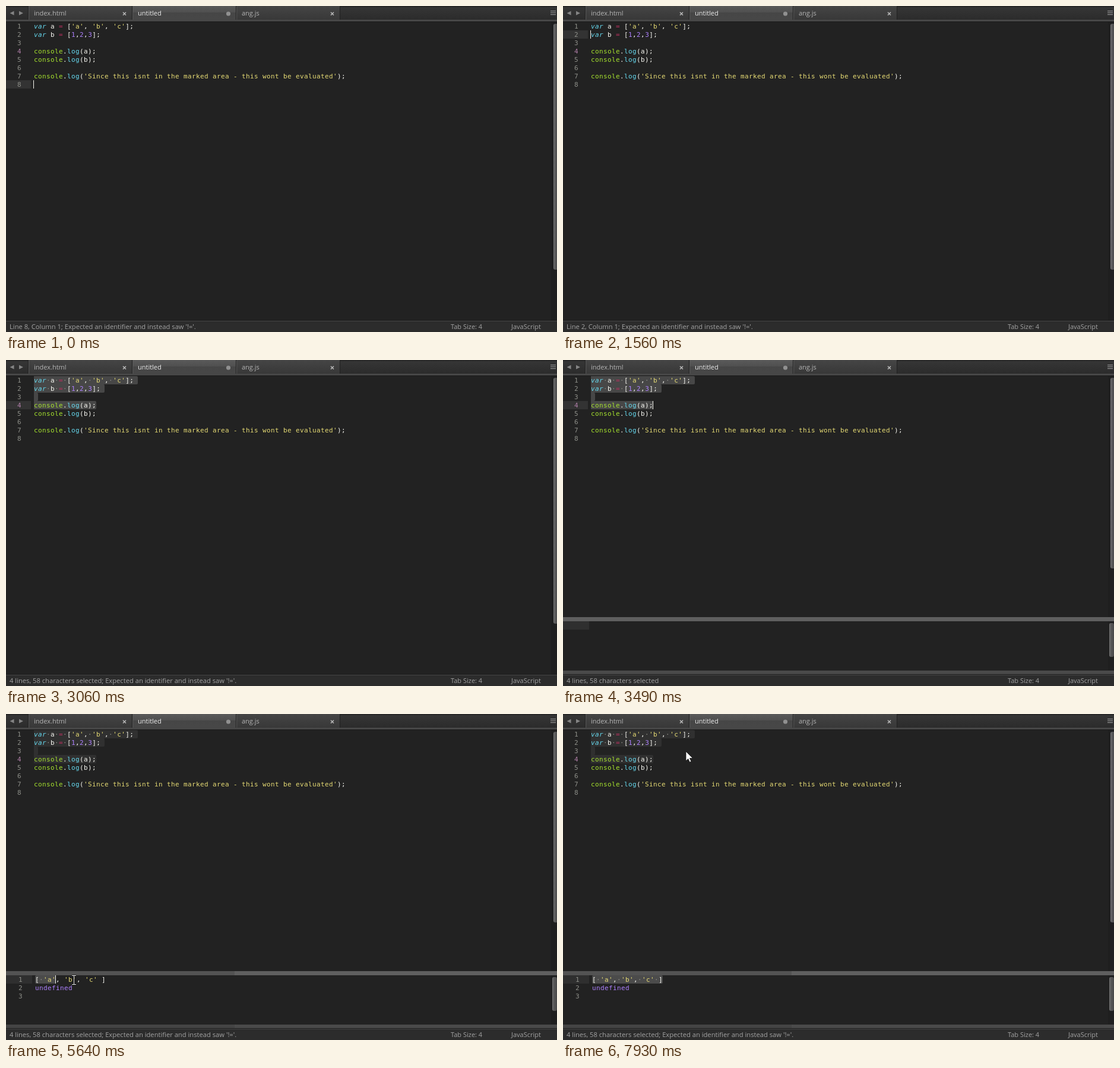
Animation, 928 px wide and 549 px high, one loop 8000 ms. Source, as an HTML page:

```html
<!DOCTYPE html>
<html lang="en">
<head>
<meta charset="utf-8">
<title>Editor: evaluate selection</title>
<style>
  html, body { margin: 0; width: 100%; height: 100%; overflow: hidden; background: #222; }
  svg { display: block; width: 100%; height: 100%; }
  text { white-space: pre; }
  .code { font: 11px "DejaVu Sans Mono", monospace; letter-spacing: .378px; fill: #f8f8f2; }
  .num { fill: #8f908a; }
  .ui { font: 11px "Open Sans", "Noto Sans", sans-serif; fill: #b4b4b4; }
  .status { fill: #a3a3a3; }
  .dots { fill: #8a8a84; }
</style>
</head>
<body>
<svg viewBox="0 0 928 549" xmlns="http://www.w3.org/2000/svg">
  <defs>
    <linearGradient id="bar" x2="0" y2="1"><stop stop-color="#202020"/><stop offset=".12" stop-color="#353535"/><stop offset="1" stop-color="#2b2b2b"/></linearGradient>
    <linearGradient id="tab" x2="0" y2="1"><stop stop-color="#454545"/><stop offset="1" stop-color="#383838"/></linearGradient>
    <linearGradient id="active" x2="0" y2="1"><stop stop-color="#5a5a5a"/><stop offset=".45" stop-color="#505050"/><stop offset=".5" stop-color="#464646"/><stop offset="1" stop-color="#474747"/></linearGradient>
    <linearGradient id="thumb"><stop stop-color="#747474"/><stop offset=".3" stop-color="#5a5a5a"/><stop offset="1" stop-color="#484848"/></linearGradient>
  </defs>

  <rect width="928" height="549" fill="#222"/>
  <rect id="row" width="42" height="14" fill="#333"/>
  <path id="selection"/>
  <g id="code"></g>
  <g id="mainDots" class="code dots"></g>
  <rect id="caret" width="1" height="14" fill="#f8f8f0"/>

  <rect x="918" y="27" width="10" height="503" fill="#1f1f1f"/>
  <rect id="thumbBar" x="922" y="30" width="8" rx="3" fill="url(#thumb)"/>

  <g id="tabs"></g>

  <g id="panel">
    <rect y="433" width="928" height="97" fill="#222"/>
    <rect y="433" width="928" height="7" fill="#5f5f5f"/>
    <rect x="918" y="440" width="10" height="83" fill="#1f1f1f"/>
    <rect x="920" y="443" width="8" height="57" rx="3" fill="url(#thumb)"/>
    <rect y="523" width="928" height="7" fill="#4a4a4a"/>
    <g id="shade">
      <rect y="433" width="385" height="7" opacity=".12"/>
      <rect y="523" width="385" height="6" opacity=".08"/>
    </g>
    <rect y="440" width="44" height="14" fill="#2f2f2f"/>
    <rect id="outSel" x="49" y="440" height="14" rx="2" fill="#4b4b4b"/>
    <g id="output"></g>
    <text id="outDots" class="code dots" x="49" y="451"></text>
    <rect id="outCaret" y="440" width="1" height="14" fill="#f8f8f0"/>
  </g>

  <rect y="529" width="928" height="20" fill="#2c2c2c"/>
  <rect y="529" width="928" height="1" fill="#1a1a1a"/>
  <rect y="530" width="928" height="1" fill="#484848"/>
  <text id="status" class="ui status" x="6" y="544" style="font-size:11.2px"></text>
  <text class="ui status" x="749" y="544">Tab Size: 4</text>
  <text class="ui status" x="851" y="544">JavaScript</text>

  <g id="beam" fill="none">
    <path d="M-3.5 -7.5H4.5M.5 -7V7M-3.5 7.5H4.5" stroke="#111" stroke-width="3" opacity=".6"/>
    <path d="M-3 -7.5H4M.5 -7.5V7.5M-3 7.5H4" stroke="#e8e8e8"/>
  </g>
  <path id="arrow" d="M0 0V16L3.8 12.6L6.4 18.2L9 17L6.5 11.5H11.6Z" fill="#fff" stroke="#111" stroke-width=".8"/>
</svg>

<script>
const $ = id => document.getElementById(id);
const CH = 7, ROW = 14, TOP = 27, LEFT = 47, LOOP = 8000;
const OPEN = 3490, CLICK = 5640, ARROW = 7780;
const C = { w: '#f8f8f2', k: '#66d9ef', o: '#b8305e', s: '#e6db74', n: '#ae81ff', g: '#a6e22e' };

// Each run is a colour key and its text.
const call = arg => [['g', 'console'], ['w', '.'], ['k', 'log'], ['w', '('], arg, ['w', ');']];
const list = (color, items, gap) =>
  items.flatMap((s, i) => i ? [['w', gap], [color, s]] : [[color, s]]);
const letters = list('s', ["'a'", "'b'", "'c'"], ', ');
const digits = list('n', ['1', '2', '3'], ',');
const declare = (name, items) => [['k', 'var'], ['w', ` ${name} `], ['o', '='], ['w', ' ['], ...items, ['w', '];']];
const source = [
  declare('a', letters), declare('b', digits), [],
  call(['w', 'a']), call(['w', 'b']), [],
  call(['s', "'Since this isnt in the marked area - this wont be evaluated'"]), []
];
const result = [[['w', '[ '], ...letters, ['w', ' ]']], [['n', 'undefined']], []];

const plain = runs => runs.map(r => r[1]).join('');
const dots = text => [...text].map(c => c === ' ' ? '·' : ' ').join('');

function listing(lines, x, numX, y) {
  return lines.map((runs, i) => {
    const by = y + i * ROW;
    const spans = runs.map(([c, s]) =>
      `<tspan fill="${C[c]}"${s === 'var' ? ' font-style="italic"' : ''}>${s}</tspan>`).join('');
    return `<text class="code num" x="${numX}" y="${by}">${i + 1}</text>` +
           `<text class="code" x="${x}" y="${by}">${spans}</text>`;
  }).join('');
}

$('code').innerHTML = listing(source, LEFT, 19, 38);
$('output').innerHTML = listing(result, 49, 21, 451);
$('code').querySelectorAll('.num')[3].style.fill = '#b07fa8';

function tab(x, name, active) {
  const icon = active
    ? `<circle cx="${x + 161.5}" cy="13" r="3.6" fill="#909090"/>`
    : `<path d="M${x + 159} 10.5l5 5m0-5l-5 5" stroke="#b8b8b8" stroke-width="1.6"/>`;
  return `<rect x="${x}" width="174" height="23" fill="url(#${active ? 'active' : 'tab'})"/>
    <path d="M${x - .5} 1V23M${x + 174.5} 1V23" stroke="#202020"/>
    <path d="M${x + .5} 1V23" stroke="#5a5a5a"/>
    <text class="ui" x="${x + 9}" y="16"${active ? ' style="fill:#f0f0f0"' : ''}>${name}</text>${icon}`;
}
$('tabs').innerHTML = `<rect width="928" height="23" fill="url(#bar)"/>
  <path d="M13.5 8.5V15.5L6.5 12ZM22 8.5V15.5L29 12Z" fill="#858585"/>` +
  tab(38, 'index.html') + tab(388, 'ang.js') + tab(213, 'untitled', true) +
  `<path d="M917 8.5H926M917 11.5H926M917 14.5H926" stroke="#a0a0a0"/>
  <rect y="23" width="928" height="3" fill="#474747"/>
  <rect y="26" width="928" height="1" fill="#191919"/>`;

const clamp = (v, lo, hi) => Math.min(hi, Math.max(lo, v));
const show = (id, on) => $(id).setAttribute('opacity', Number(on));
const set = (id, attrs) => { for (const k in attrs) $(id).setAttribute(k, attrs[k]); };

// Key presses so far, for a key repeating every `gap` ms.
const presses = (t, from, gap, max) => clamp(Math.floor((t - from) / gap) + 1, 0, max);

// Solid until `since`, then blinking.
const blink = (t, since) => t < since || (t - since) % 1060 < 630;

// Mouse stops: time, x, y. Between them it moves in eased steps of about 130 ms.
const stops = [[4500, 183, 484], [5160, 54, 448], [5520, 62, 448], [CLICK, 114, 448],
  [5880, 168, 448], [6540, 48, 86], [7540, 142, 86], [ARROW, 217, 68], [7930, 207, 63]];

function mouse(t) {
  const i = stops.findLastIndex(s => s[0] <= t);
  if (i < 0) return stops[0].slice(1);
  const a = stops[i], b = stops[i + 1] || a;
  const span = b[0] - a[0] || 1, n = Math.max(1, Math.floor(span / 130));
  const u = Math.floor((t - a[0]) / span * n) / n, e = u * u * (3 - 2 * u);
  return b === a ? a.slice(1) : [1, 2].map(k => a[k] + (b[k] - a[k]) * e);
}

// Outline of one selected row, with softened right corners.
const block = (row, n) =>
  `M${LEFT} ${TOP + row * ROW}h${n * CH - 2}q2 0 2 2v${ROW - 4}q0 2 -2 2h${2 - n * CH}z`;

// Marks `full` whole lines, plus the text of the next one when `tail` is set.
function select(full, tail) {
  const parts = source.slice(0, full).map(r => plain(r) + ' ');
  if (tail) parts.push(plain(source[full]));
  set('selection', { d: parts.map((s, i) => block(i, s.length)).join('') });
  $('mainDots').innerHTML = parts.map((s, i) =>
    `<text x="${LEFT}" y="${38 + i * ROW}">${dots(s.trimEnd())}</text>`).join('');
  return parts.join('').length;
}

function draw(t) {
  const down = presses(t, 2110, 120, 3), tail = t >= 2660;
  const row = 8 - presses(t, 310, 160, 6) - presses(t, 1680, 1, 1) + down;
  const y = TOP + (row - 1) * ROW;
  const open = t >= OPEN, inPanel = t >= CLICK;

  const count = select(down, tail);
  set('selection', { fill: inPanel ? '#303030' : '#474747' });
  set('row', { y });
  show('row', !inPanel);
  set('caret', { x: tail ? 151 : 46, y });
  show('caret', !inPanel && blink(t, t < 1560 ? 650 : 2430));
  set('thumbBar', { height: open ? 321 : 414 });

  const place = count ? `${row} lines, ${count} characters selected` : `Line ${row}, Column 1`;
  const lint = !open || inPanel ? "; Expected an identifier and instead saw '!='." : '';
  $('status').textContent = place + lint;

  show('panel', open);
  show('output', t >= OPEN + 130);
  show('shade', inPanel);
  const text = plain(result[0]);
  const n = inPanel ? clamp(5 + Math.floor((t - CLICK) / 20), 5, text.length) : 0;
  set('outSel', { width: n * CH });
  $('outDots').textContent = dots(text.slice(0, n));
  set('outCaret', { x: 48 + n * CH });
  show('outCaret', inPanel && blink(t, 5880));

  const arrow = t >= ARROW;
  show('beam', t >= OPEN + 130 && !arrow);
  show('arrow', arrow);
  set(arrow ? 'arrow' : 'beam', { transform: `translate(${mouse(t).map(Math.round)})` });
}

const start = performance.now();
function tick() {
  draw((performance.now() - start) % LOOP);
  requestAnimationFrame(tick);
}
tick();
</script>
</body>
</html>
```
